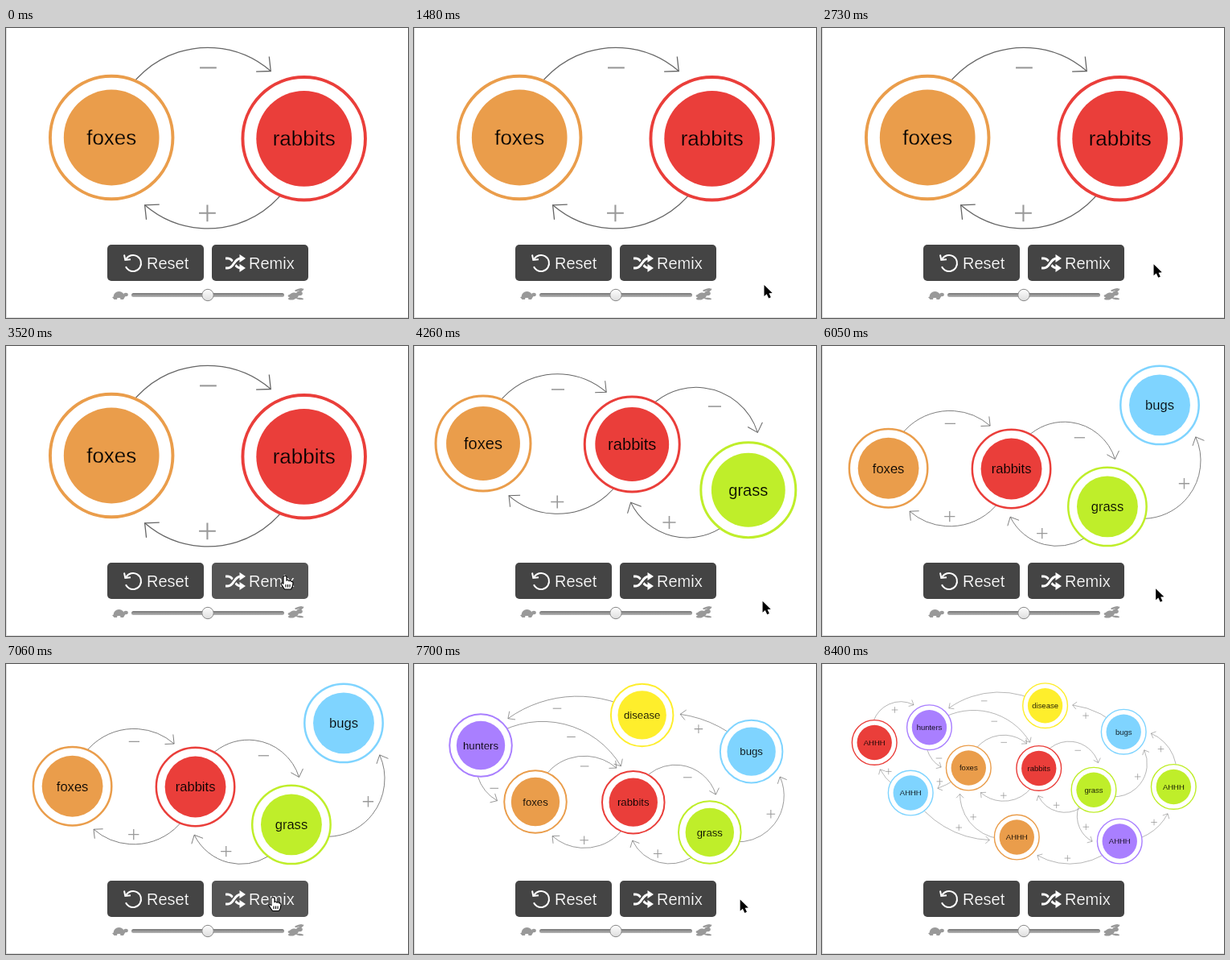
Recreate the animation shown at these times as an HTML page with a canvas. Size 500 px wide and 360 px high, loop 9.56 s.

```html
<!DOCTYPE html>
<html lang="en">
<head>
<meta charset="utf-8">
<title>Growing loops</title>
<style>
  html, body { margin: 0; width: 100%; height: 100%; overflow: hidden; background: #fff; }
  canvas { display: block; }
</style>
</head>
<body>
<canvas id="stage" width="500" height="360"></canvas>
<script>
const ctx = document.getElementById('stage').getContext('2d');
const LOOP = 9560;
const FONT = '"Liberation Sans", Arial, sans-serif';
const RED = '#ea3e3a', ORANGE = '#ea9d4b', YELLOW = '#feee2c',
      GREEN = '#bfee2a', BLUE = '#7fd4ff', PURPLE = '#a97fff';

// World coordinates, with the first node at the origin.
const nodes = [
  ['foxes', 0, 0, ORANGE], ['rabbits', 369, 2, RED], ['grass', 657, 115, GREEN],
  ['bugs', 814, -189, BLUE], ['hunters', -206, -212, PURPLE], ['disease', 402, -326, YELLOW],
  ['AHHH', -494, -133, RED], ['AHHH', -304, 131, BLUE], ['AHHH', 253, 363, ORANGE],
  ['AHHH', 793, 384, PURPLE], ['AHHH', 1076, 99, GREEN]
].map(([name, x, y, color]) => ({ name, x, y, color }));

// from, to, bulge to the left of travel, sign
const edges = [
  [0, 1, 173, '-'], [1, 0, 173, '+'], [1, 2, 200, '-'], [2, 1, 176, '+'],
  [2, 3, -205, '+'], [3, 5, -56, '+'], [5, 4, -122, '-'], [4, 1, 187, '-'],
  [4, 0, -107, '-'], [6, 4, 175, '+'], [7, 6, 60, '+'], [0, 7, 35, '+'],
  [7, 8, -100, '+'], [8, 0, 158, '+'], [9, 8, 129, '+'], [2, 9, -156, '+'],
  [9, 10, -89, '+'], [10, 3, -121, '+']
];

const scenes = [
  { start: 0, count: 2, x: 131.2, y: 136, scale: 0.649 },
  { start: 3580, count: 3, x: 86, y: 121, scale: 0.502 },
  { start: 5650, count: 4, x: 82.6, y: 151.7, scale: 0.4145 },
  { start: 7110, count: 6, x: 151, y: 171, scale: 0.33 },
  { start: 7760, count: 11, x: 182.3, y: 129, scale: 0.237 }
];

// Pointer track: time, x, y
const track = [
  [960, 497, 325], [1480, 435, 318.5], [2500, 435, 318.5], [2850, 394, 277],
  [3060, 360, 261.5], [3300, 348, 280], [3460, 347, 285.5], [3650, 347, 285.5],
  [4320, 435, 317], [4740, 435, 317], [5450, 347, 285.5], [5690, 347, 285.5],
  [6230, 438, 306], [6770, 438, 306], [7040, 332, 290], [7300, 332, 290],
  [7700, 405, 292], [8400, 500, 309]
];

function path(build) {
  ctx.beginPath();
  build(ctx);
}

function polyline(points, close) {
  path(c => {
    points.forEach(([x, y]) => c.lineTo(x, y));
    if (close) c.closePath();
  });
}

function disc(x, y, rx, ry = rx, turn = 0) {
  path(c => c.ellipse(x, y, rx, ry, turn, 0, 2 * Math.PI));
}

// Thins the letters slightly by outlining them in the backdrop colour.
function lightText(text, x, y, size, color, backdrop, align) {
  ctx.font = `300 ${size}px ${FONT}`;
  ctx.textAlign = align;
  ctx.fillStyle = color;
  ctx.fillText(text, x, y);
  ctx.strokeStyle = backdrop;
  ctx.lineWidth = size * 0.012;
  ctx.strokeText(text, x, y);
}

function drawEdge([from, to, bulge, sign]) {
  const a = nodes[from], b = nodes[to];
  const dx = b.x - a.x, dy = b.y - a.y, length = Math.hypot(dx, dy);
  const nx = dy / length, ny = -dx / length;
  const mx = (a.x + b.x) / 2, my = (a.y + b.y) / 2;
  const radius = (length * length / 4 + bulge * bulge) / (2 * bulge);
  const cx = mx + nx * (bulge - radius), cy = my + ny * (bulge - radius);
  const side = Math.sign(bulge), r = Math.abs(radius);
  const first = Math.atan2(a.y - cy, a.x - cx);
  const last = Math.atan2(b.y - cy, b.x - cx) - side * 2 * Math.asin(144 / (2 * r));

  ctx.strokeStyle = '#666';
  ctx.lineWidth = 2;
  path(c => c.arc(cx, cy, r, first, last, side < 0));
  ctx.stroke();

  const tipX = cx + r * Math.cos(last), tipY = cy + r * Math.sin(last);
  const back = last - side * Math.PI / 2;
  const leg = turn => [tipX + 28 * Math.cos(back + turn), tipY + 28 * Math.sin(back + turn)];
  polyline([leg(-0.75), [tipX, tipY], leg(0.75)]);
  ctx.stroke();

  const offset = bulge - side * 34;
  const lx = mx + nx * offset, ly = my + ny * offset + 4.5;
  ctx.strokeStyle = '#999';
  ctx.lineWidth = 3.2;
  path(c => {
    c.moveTo(lx - 16, ly);
    c.lineTo(lx + 16, ly);
    if (sign === '+') {
      c.moveTo(lx, ly - 16);
      c.lineTo(lx, ly + 16);
    }
  });
  ctx.stroke();
}

function drawNode({ name, x, y, color }) {
  disc(x, y, 117.5);
  ctx.fillStyle = '#fff';
  ctx.fill();
  ctx.strokeStyle = color;
  ctx.lineWidth = 6;
  ctx.stroke();
  disc(x, y, 91.5);
  ctx.fillStyle = color;
  ctx.fill();
  lightText(name, x, y + 14, 40, '#000', color, 'center');
}

function drawGraph({ count, x, y, scale }) {
  ctx.save();
  ctx.translate(x, y);
  ctx.scale(scale, scale);
  edges.filter(([from, to]) => from < count && to < count).forEach(drawEdge);
  nodes.slice(0, count).forEach(drawNode);
  ctx.restore();
}

function drawButton(x, label, textX, fill) {
  path(c => c.roundRect(x, 269, 120, 45, 5));
  ctx.fillStyle = fill;
  ctx.fill();
  lightText(label, textX, 299, 20, '#fff', fill, 'left');
}

function drawResetIcon() {
  ctx.strokeStyle = '#fff';
  ctx.lineWidth = 2;
  path(c => c.arc(158, 292, 10, -2.6, 2.7));
  ctx.stroke();
  polyline([[147, 281.5], [148.3, 288], [155, 287.2]]);
  ctx.stroke();
}

function drawShuffleIcon(fill) {
  const strand = (y1, y2) => path(c => {
    c.moveTo(273, y1);
    c.lineTo(276, y1);
    c.bezierCurveTo(284, y1, 283, y2, 292, y2);
  });
  const stroke = (color, width) => {
    ctx.strokeStyle = color;
    ctx.lineWidth = width;
    ctx.stroke();
  };
  strand(286, 298);
  stroke('#fff', 3);
  strand(298, 286);
  stroke(fill, 6);
  stroke('#fff', 3);
  ctx.fillStyle = '#fff';
  for (const y of [286, 298]) {
    polyline([[290.5, y - 5], [298, y], [290.5, y + 5]], true);
    ctx.fill();
  }
}

function drawTurtle() {
  ctx.fillStyle = '#999';
  path(c => c.ellipse(140.5, 334, 7, 7, 0, Math.PI, 0));
  ctx.fill();
  disc(149, 331, 2.8, 2.2);
  ctx.fill();
  polyline([[132, 334], [149, 332], [146, 337], [142.5, 337], [142, 335],
            [138.5, 335], [138, 337], [134.5, 337]], true);
  ctx.fill();
}

function drawHare() {
  ctx.fillStyle = '#999';
  const blobs = [[358, 332.5, 6, 4, -0.2], [365, 329.5, 3.8, 2.8, 0], [364, 325, 5, 1.4, -0.25],
                 [367, 326, 4, 1.2, -0.6], [355, 336, 4, 1.5, 0], [365.5, 336, 4.5, 1.2, 0.1],
                 [352.5, 332.5, 1.8, 1.5, 0]];
  for (const blob of blobs) {
    disc(...blob);
    ctx.fill();
  }
}

function drawSlider() {
  const groove = ctx.createLinearGradient(0, 329, 0, 334);
  groove.addColorStop(0, '#777');
  groove.addColorStop(1, '#b5b5b5');
  path(c => c.roundRect(156, 329, 190, 5, 2.5));
  ctx.fillStyle = groove;
  ctx.fill();
  const shine = ctx.createLinearGradient(0, 324, 0, 339);
  shine.addColorStop(0, '#fff');
  shine.addColorStop(1, '#ddd');
  disc(251, 331.5, 7.2);
  ctx.fillStyle = shine;
  ctx.fill();
  ctx.strokeStyle = '#888';
  ctx.lineWidth = 1;
  ctx.stroke();
  drawTurtle();
  drawHare();
}

// Monotone cubic interpolation, so pauses stay still.
function trackValue(i, axis, t) {
  const slope = k => {
    if (k < 0 || k >= track.length - 1) return 0;
    return (track[k + 1][axis] - track[k][axis]) / (track[k + 1][0] - track[k][0]);
  };
  const tangent = k => {
    const before = slope(k - 1), after = slope(k);
    return before * after > 0 ? 2 * before * after / (before + after) : 0;
  };
  const [p, q] = [track[i], track[i + 1]];
  const span = q[0] - p[0], u = (t - p[0]) / span, v = 1 - u;
  return p[axis] * v * v * (1 + 2 * u) + q[axis] * u * u * (3 - 2 * u)
    + span * u * v * (v * tangent(i) - u * tangent(i + 1));
}

function pointerAt(t) {
  const i = track.findIndex((p, k) => k < track.length - 1 && t >= p[0] && t < track[k + 1][0]);
  return i < 0 ? null : { x: trackValue(i, 1, t), y: trackValue(i, 2, t) };
}

function drawArrow() {
  polyline([[0.5, 0.5], [0.5, 14.5], [3.7, 11.7], [6.2, 17], [8.8, 15.8],
            [6.5, 10.8], [10.7, 10.4]], true);
  ctx.lineWidth = 1.6;
  ctx.strokeStyle = '#fff';
  ctx.stroke();
  ctx.fillStyle = '#000';
  ctx.fill();
}

function drawHand() {
  path(c => {
    c.moveTo(-2, 10);
    c.lineTo(-2, 1);
    c.quadraticCurveTo(0, -1.5, 2, 1);
    c.lineTo(2, 5.5);
    c.quadraticCurveTo(4, 4.2, 5, 6.2);
    c.quadraticCurveTo(7, 5, 8, 7);
    c.quadraticCurveTo(10, 6.5, 10, 9);
    c.quadraticCurveTo(10, 13, 7.5, 16.5);
    c.lineTo(-0.5, 16.5);
    c.lineTo(-5, 9.8);
    c.quadraticCurveTo(-4.5, 7.2, -2, 10);
  });
  ctx.fillStyle = '#fff';
  ctx.fill();
  ctx.strokeStyle = '#000';
  ctx.lineWidth = 1.1;
  ctx.stroke();
  path(c => {
    for (const x of [1, 3.5, 6]) {
      c.moveTo(x, 10.5);
      c.lineTo(x, 14);
    }
  });
  ctx.stroke();
}

function draw(t) {
  ctx.fillStyle = '#fff';
  ctx.fillRect(0, 0, 500, 360);
  ctx.fillStyle = '#ddd';
  ctx.fillRect(0, 0, 1, 360);
  ctx.fillRect(0, 359, 500, 1);

  drawGraph(scenes.findLast(scene => t >= scene.start));

  const pointer = pointerAt(t);
  const hover = pointer && pointer.x >= 256 && pointer.x < 376
    && pointer.y >= 269 && pointer.y < 314;
  const remixFill = hover ? '#555' : '#444';
  drawButton(126, 'Reset', 175, '#444');
  drawButton(256, 'Remix', 302, remixFill);
  drawResetIcon();
  drawShuffleIcon(remixFill);
  drawSlider();

  if (pointer) {
    ctx.save();
    ctx.translate(pointer.x, pointer.y);
    (hover ? drawHand : drawArrow)();
    ctx.restore();
  }
}

let began;
function tick() {
  const now = performance.now();
  began ??= now;
  draw((now - began) % LOOP);
  requestAnimationFrame(tick);
}
tick();
</script>
</body>
</html>
```
